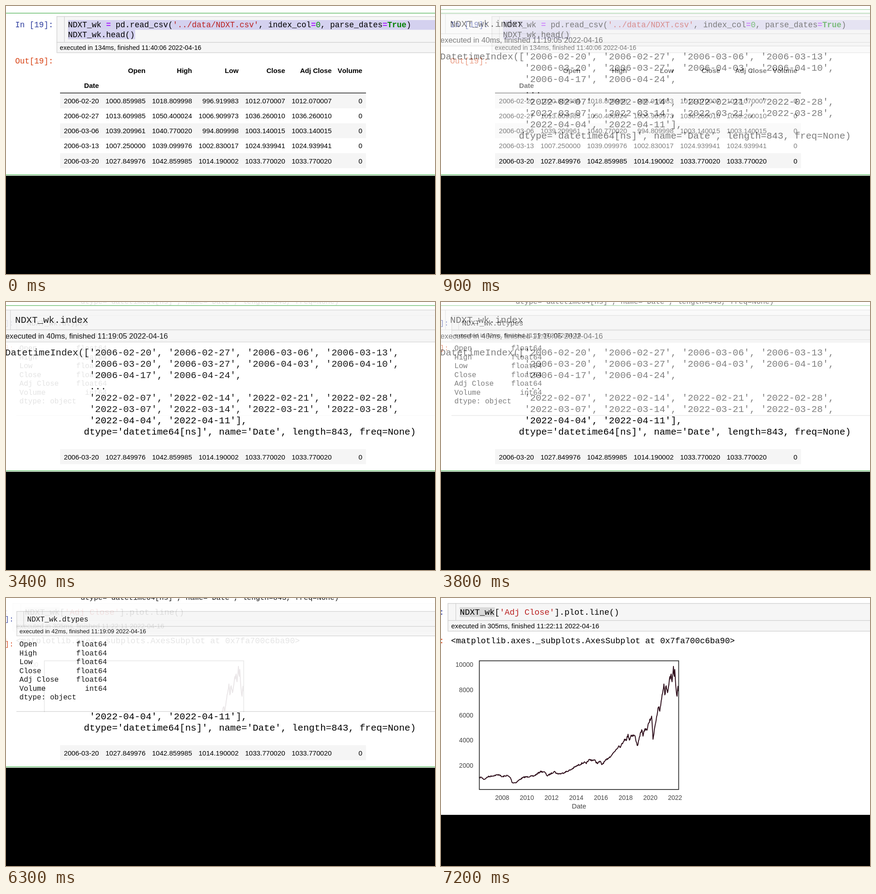
Write an HTML page with a canvas that moves like this. It is 945 by 592 pixels and loops after 8000 ms.

```html
<!DOCTYPE html>
<html lang="en">
<head>
<meta charset="utf-8">
<title>Notebook slides</title>
<style>
html, body { margin: 0; width: 100%; height: 100%; overflow: hidden; background: #000; }
canvas { display: block; }
</style>
</head>
<body>
<canvas id="stage" width="945" height="592"></canvas>
<script>
const W = 945, H = 592, LOOP = 8000, STEP = 100;
const MONO = '"Liberation Mono", "Courier New", monospace';
const SANS = '"Liberation Sans", Arial, sans-serif';
const GREEN = '#66bb6a', BORDER = '#cfcfcf', BLUE = '#303f9f', ORANGE = '#d84315';
const PURPLE = '#aa22ff', STRING = '#ba2121', NUMBER = '#008000';
let g; // context of the slide being painted

function slide(height, paint) {
  const canvas = document.createElement('canvas');
  canvas.width = W;
  canvas.height = height;
  g = canvas.getContext('2d');
  g.fontKerning = 'none';
  rect(0, 0, W, height, '#fff');
  paint();
  return canvas;
}

function rect(x, y, w, h, color) {
  g.fillStyle = color;
  g.fillRect(x, y, w, h);
}

function text(str, x, y, font, color = '#000', align = 'left') {
  g.font = font;
  g.fillStyle = color;
  g.textAlign = align;
  g.fillText(str, x, y);
}

// Parts are plain strings or [string, color, weight].
function code(parts, x, y, size) {
  for (const part of [].concat(parts)) {
    const [str, color, weight = ''] = Array.isArray(part) ? part : [part];
    text(str, x, y, `${weight} ${size}px ${MONO}`, color);
    x += g.measureText(str).width;
  }
}

function lines(list, x, y, size, gap) {
  list.forEach((line, i) => code(line, x, y + i * gap, size));
}

function inputCell(left, top, gutter, middle, bottom) {
  rect(left, top, W - left, bottom - top, '#f6f6f6');
  rect(left, top, W - left, 1.3, BORDER);
  rect(left, middle, W - left, 1.3, BORDER);
  rect(left, bottom, W - left, 1.3, BORDER);
  rect(left, top, 1.3, bottom - top, BORDER);
  rect(gutter, top, 1.2, middle - top, BORDER);
}

function paintHead() {
  rect(0, 15, W, 1.5, GREEN);
  inputCell(111.5, 22.7, 128, 79.7, 102.5);
  rect(136.5, 31, W, 21.5, '#d4d1ef');
  rect(136.5, 52.5, 148, 21, '#d4d1ef');
  const size = 17.5;
  code([['In [19]:', BLUE]], 20.3, 47, size);
  code([['Out[19]:', ORANGE]], 20.3, 127, size);
  code(['NDXT_wk ', ['=', PURPLE, 'bold'], ' pd.read_csv(', ["'../data/NDXT.csv'", STRING],
    ', index_col', ['=', PURPLE, 'bold'], ['0', NUMBER], ', parse_dates', ['=', PURPLE, 'bold'],
    ['True', NUMBER, 'bold'], ')'], 136.5, 47, size);
  code('NDXT_wk.head()', 136.5, 68.5, size);
  text('executed in 134ms, finished 11:40:06 2022-04-16', 118.6, 97, `14.2px ${SANS}`);

  const right = [204.7, 307.3, 409.8, 512.3, 614.8, 717.3, 785];
  const row = (cells, y, weight = '') => cells.forEach((cell, i) =>
    text(cell, right[i], y, `${weight} 15.1px ${SANS}`, '#000', 'right'));
  row(['', 'Open', 'High', 'Low', 'Close', 'Adj Close', 'Volume'], 147.5, 'bold');
  row(['Date'], 180.5, 'bold');
  rect(119, 191.5, 674, 1.4, '#111');
  [
    '2006-02-20 1000.859985 1018.809998 996.919983 1012.070007 1012.070007 0',
    '2006-02-27 1013.609985 1050.400024 1006.909973 1036.260010 1036.260010 0',
    '2006-03-06 1039.209961 1040.770020 994.809998 1003.140015 1003.140015 0',
    '2006-03-13 1007.250000 1039.099976 1002.830017 1024.939941 1024.939941 0',
    '2006-03-20 1027.849976 1042.859985 1014.190002 1033.770020 1033.770020 0'
  ].forEach((values, i) => {
    const y = 193 + 33.05 * i;
    if (i % 2 === 0) rect(119, y, 674, 33, '#f5f5f5');
    row(values.split(' '), y + 22.3);
  });
  rect(0, 372, W, 1.6, GREEN);
}

const dtypeLine = "dtype='datetime64[ns]', name='Date', length=843, freq=None)";

function paintIndex() {
  const size = 20.67, pad = ' '.repeat(15);
  rect(0, 7, W, 1.5, GREEN);
  inputCell(-3, 17, 9.2, 60.7, 87.7);
  code('NDXT_wk.index', 20, 46, size);
  text('executed in 40ms, finished 11:19:05 2022-04-16', -1.2, 80.7, `16.73px ${SANS}`);
  lines([
    "DatetimeIndex(['2006-02-20', '2006-02-27', '2006-03-06', '2006-03-13',",
    pad + "'2006-03-20', '2006-03-27', '2006-04-03', '2006-04-10',",
    pad + "'2006-04-17', '2006-04-24',",
    pad + '...',
    pad + "'2022-02-07', '2022-02-14', '2022-02-21', '2022-02-28',",
    pad + "'2022-03-07', '2022-03-14', '2022-03-21', '2022-03-28',",
    pad + "'2022-04-04', '2022-04-11'],",
    pad.slice(1) + dtypeLine
  ], -2, 118, size, 25.07);
}

function paintTypes() {
  const size = 16.07;
  code(dtypeLine, 164.5, 3.5, size);
  inputCell(23, 29, 38.3, 62, 83);
  code([[']:', BLUE]], -2.5, 51.5, size);
  code('NDXT_wk.dtypes', 46.5, 51.5, size);
  text('executed in 42ms, finished 11:19:09 2022-04-16', 29.7, 77.8, `13.04px ${SANS}`);
  code([[']:', ORANGE]], -2.5, 107, size);
  const columns = ['Open', 'High', 'Low', 'Close', 'Adj Close', 'Volume'];
  const types = columns.map(name =>
    name.padEnd(13) + (name === 'Volume' ? 'int64' : 'float64').padStart(7));
  lines([...types, 'dtype: object'], 29.5, 107, size, 19.55);
  rect(23, 250, W, 1.3, BORDER);
}

// Turning points of the price curve, in stage pixels.
const curve = [
  84, 397, 89, 396, 95, 401, 103, 395, 128, 390, 134, 395, 146, 392, 153, 397, 157, 408,
  165, 408, 172, 402, 182, 396, 205, 393, 220, 383, 229, 385, 234, 393, 250, 383, 255, 388,
  265, 388, 285, 380, 297, 372, 315, 363, 320, 366, 325, 358, 338, 358, 344, 365, 351, 361,
  354, 368, 368, 354, 376, 347, 386, 334, 391, 327, 396, 328, 404, 312, 408, 315, 412, 301,
  415, 314, 419, 303, 427, 304, 430, 318, 433, 326, 437, 307, 442, 291, 445, 305, 449, 289,
  453, 292, 458, 276, 464, 261, 467, 312, 470, 290, 475, 262, 479, 241, 482, 250, 486, 223,
  491, 190, 493, 214, 496, 194, 499, 209, 503, 181, 507, 168, 509, 185, 512, 151, 514, 173,
  515, 158, 518, 203, 520, 217, 522, 195, 523, 206
];

function paintCurve() {
  let seed = 7;
  const noise = () => (seed = seed * 16807 % 2147483647) / 2147483647 - 0.5;
  g.beginPath();
  for (let i = 0; i < curve.length - 2; i += 2) {
    const [x0, y0, x1, y1] = curve.slice(i, i + 4);
    g.lineTo(x0, y0);
    for (let x = x0 + 1; x < x1; x++) {
      const y = y0 + (y1 - y0) * (x - x0) / (x1 - x0);
      g.lineTo(x, y + noise() * (1.6 + (425 - y) * 0.035));
    }
  }
  g.lineTo(...curve.slice(-2));
  g.strokeStyle = '#30101d';
  g.lineWidth = 2;
  g.lineJoin = 'round';
  g.stroke();
}

function paintPlot() {
  const size = 18.3, label = '#444';
  inputCell(14.7, 11.5, 32, 49, 72.7);
  rect(41, 20.5, 77.5, 21.5, '#d9d9d9');
  code([[':', BLUE]], -4, 37, size);
  code(['NDXT_wk[', ["'Adj Close'", STRING], '].plot.line()'], 41.5, 37, size);
  text('executed in 305ms, finished 11:22:11 2022-04-16', 22.5, 67, `14.85px ${SANS}`);
  code([[':', ORANGE]], -4, 99.5, size);
  code('<matplotlib.axes._subplots.AxesSubplot at 0x7fa700c6ba90>', 22, 99.5, size);

  paintCurve();
  g.strokeStyle = '#333';
  g.lineWidth = 1.8;
  g.lineJoin = 'miter';
  g.strokeRect(84.5, 138.7, 439, 284.3);
  for (let i = 0; i < 5; i++)
    text(10000 - 2000 * i, 71, 152.3 + 55.7 * i, `14px ${SANS}`, label, 'right');
  for (let i = 0; i < 8; i++)
    text(2008 + 2 * i, 134.7 + 54.4 * i, 445.7, `14px ${SANS}`, label, 'center');
  text('Date', 304, 464.5, `15px ${SANS}`, label, 'center');
}

// Each slide fades in over the ones before it.
const slides = [
  { start: -LOOP, image: slide(375, paintHead) },
  { start: 500, image: slide(320, paintIndex) },
  { start: 3400, image: slide(252, paintTypes) },
  { start: 6300, image: slide(479, paintPlot) }
];
const stage = document.getElementById('stage').getContext('2d');

function frame(now) {
  const t = now % LOOP;
  stage.globalAlpha = 1;
  stage.fillStyle = '#000';
  stage.fillRect(0, 0, W, H);
  slides.forEach(({ start, image }, i) => {
    const step = Math.min(10, Math.floor((t - start) / STEP) + 1);
    if (step <= 0) return;
    // A fading slide only shows where it overlaps the previous one.
    const h = step < 10 ? Math.min(image.height, slides[i - 1].image.height) : image.height;
    stage.globalAlpha = step / 10;
    stage.drawImage(image, 0, 0, W, h, 0, 0, W, h);
  });
  requestAnimationFrame(() => frame(performance.now()));
}
frame(0);
</script>
</body>
</html>
```
